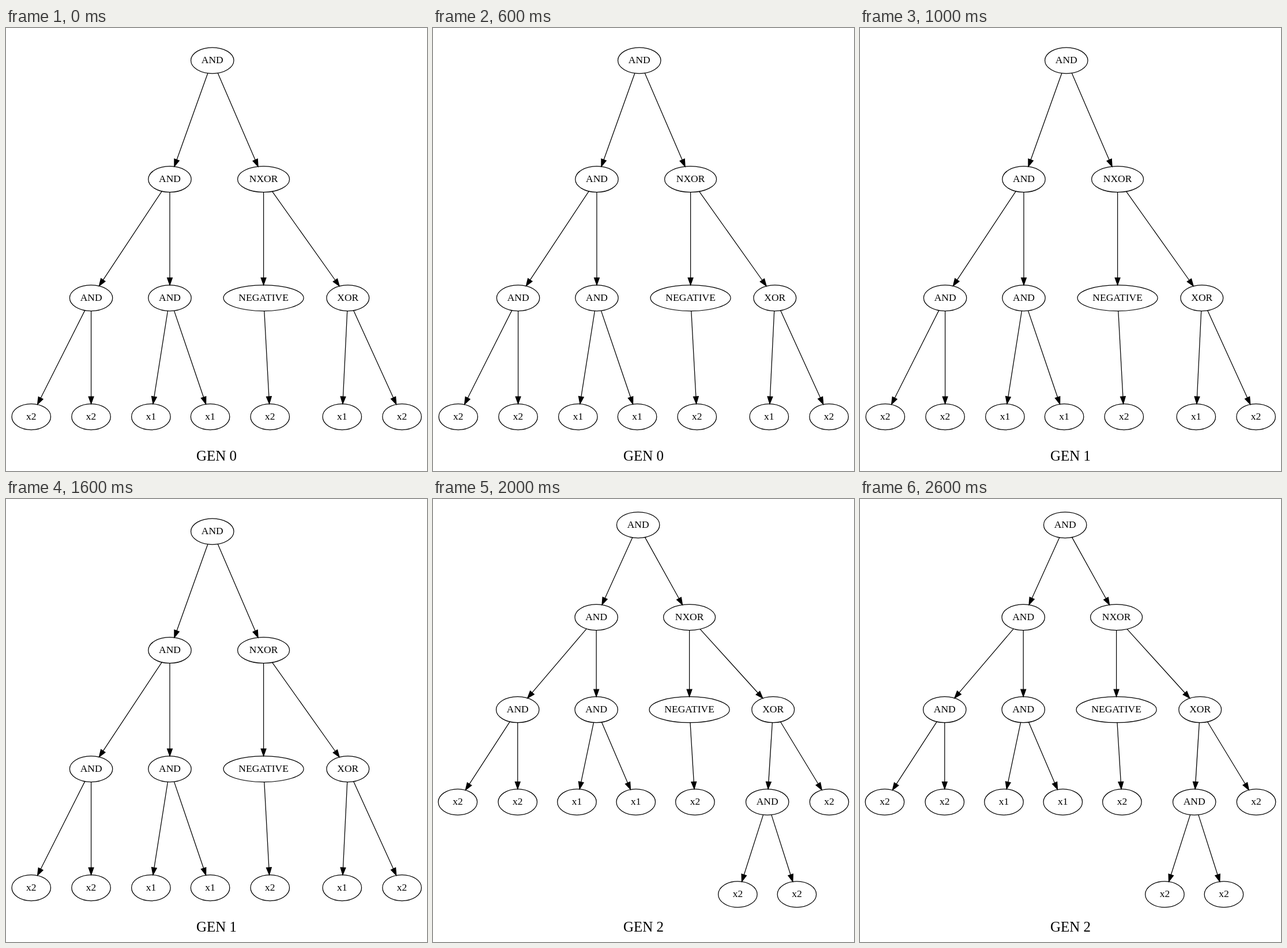
Write an HTML page that moves like this. It is 730 px wide and 768 px high and loops after 3000 ms.

```html
<!DOCTYPE html>
<html lang="en">
<head>
<meta charset="utf-8">
<title>Expression tree by generation</title>
<style>
  html, body { margin: 0; width: 100%; height: 100%; overflow: hidden; background: #fff; }
  svg { display: block; }
  text { font-family: "Liberation Serif", "Times New Roman", Times, serif; font-size: 17.5px; text-anchor: middle; }
  .title { font-size: 25px; }
  ellipse, line { fill: none; stroke: #000; stroke-width: 1.25; }
  polygon { stroke: #000; stroke-width: 1.25; }
</style>
</head>
<body>
<svg id="stage" width="730" height="768" viewBox="0 0 730 768"></svg>
<script>
const STEP = 1000;
const RY = 22.5;
const HEAD = 12.5, HALF = 4.4;
const RX = { AND: 37.2, NXOR: 45, XOR: 36.9, NEGATIVE: 69.5, x1: 33.75, x2: 33.75 };

// A node is [label, x, ...children]; its depth gives y.
const small = ["AND", 357.8,
  ["AND", 284,
    ["AND", 147.6, ["x2", 43.8], ["x2", 147.6]],
    ["AND", 284, ["x1", 251.4], ["x1", 354.1]]],
  ["NXOR", 446.6,
    ["NEGATIVE", 446.6, ["x2", 457.8]],
    ["XOR", 592.8, ["x1", 582.8], ["x2", 686.6]]]];

const large = ["AND", 355.7,
  ["AND", 283.2,
    ["AND", 146.8, ["x2", 42.9], ["x2", 146.8]],
    ["AND", 283.2, ["x1", 249.5], ["x1", 351.8]]],
  ["NXOR", 444.6,
    ["NEGATIVE", 444.6, ["x2", 454.4]],
    ["XOR", 589.7,
      ["AND", 579.7, ["x2", 528.4], ["x2", 630.9]],
      ["x2", 687]]]];

const generations = [
  { tree: small, top: 56.3, gap: 205.9 },
  { tree: small, top: 56.3, gap: 205.9 },
  { tree: large, top: 45, gap: 160.1 }
];

const fix = n => n.toFixed(2);

// Distance from an ellipse's centre to its rim along a unit direction.
const rim = (label, ux, uy) => 1 / Math.hypot(ux / RX[label], uy / RY);

function edge(from, x1, y1, to, x2, y2) {
  const len = Math.hypot(x2 - x1, y2 - y1);
  const ux = (x2 - x1) / len, uy = (y2 - y1) / len;
  const start = rim(from, ux, uy), tip = len - rim(to, ux, uy);
  const at = (d, side = 0) => [fix(x1 + ux * d - uy * side), fix(y1 + uy * d + ux * side)];
  const [ax, ay] = at(start), [bx, by] = at(tip - HEAD);
  const head = [at(tip), at(tip - HEAD, HALF), at(tip - HEAD, -HALF)].join(" ");
  return `<line x1="${ax}" y1="${ay}" x2="${bx}" y2="${by}"/><polygon points="${head}"/>`;
}

function branch([label, x, ...children], y, gap) {
  let out = `<ellipse cx="${x}" cy="${fix(y)}" rx="${RX[label]}" ry="${RY}"/>` +
    `<text x="${x}" y="${fix(y + 4.6)}">${label}</text>`;
  for (const child of children) {
    out += edge(label, x, y, child[0], child[1], y + gap) + branch(child, y + gap, gap);
  }
  return out;
}

const stage = document.getElementById("stage");
let shown = -1;

function draw(time) {
  const gen = Math.floor(time / STEP) % generations.length;
  if (gen === shown) return;
  shown = gen;
  const { tree, top, gap } = generations[gen];
  stage.innerHTML = branch(tree, top, gap) +
    `<text class="title" x="365" y="750">GEN ${gen}</text>`;
}

const began = performance.now();
function tick() {
  draw(performance.now() - began);
  requestAnimationFrame(tick);
}
tick();
</script>
</body>
</html>
```
